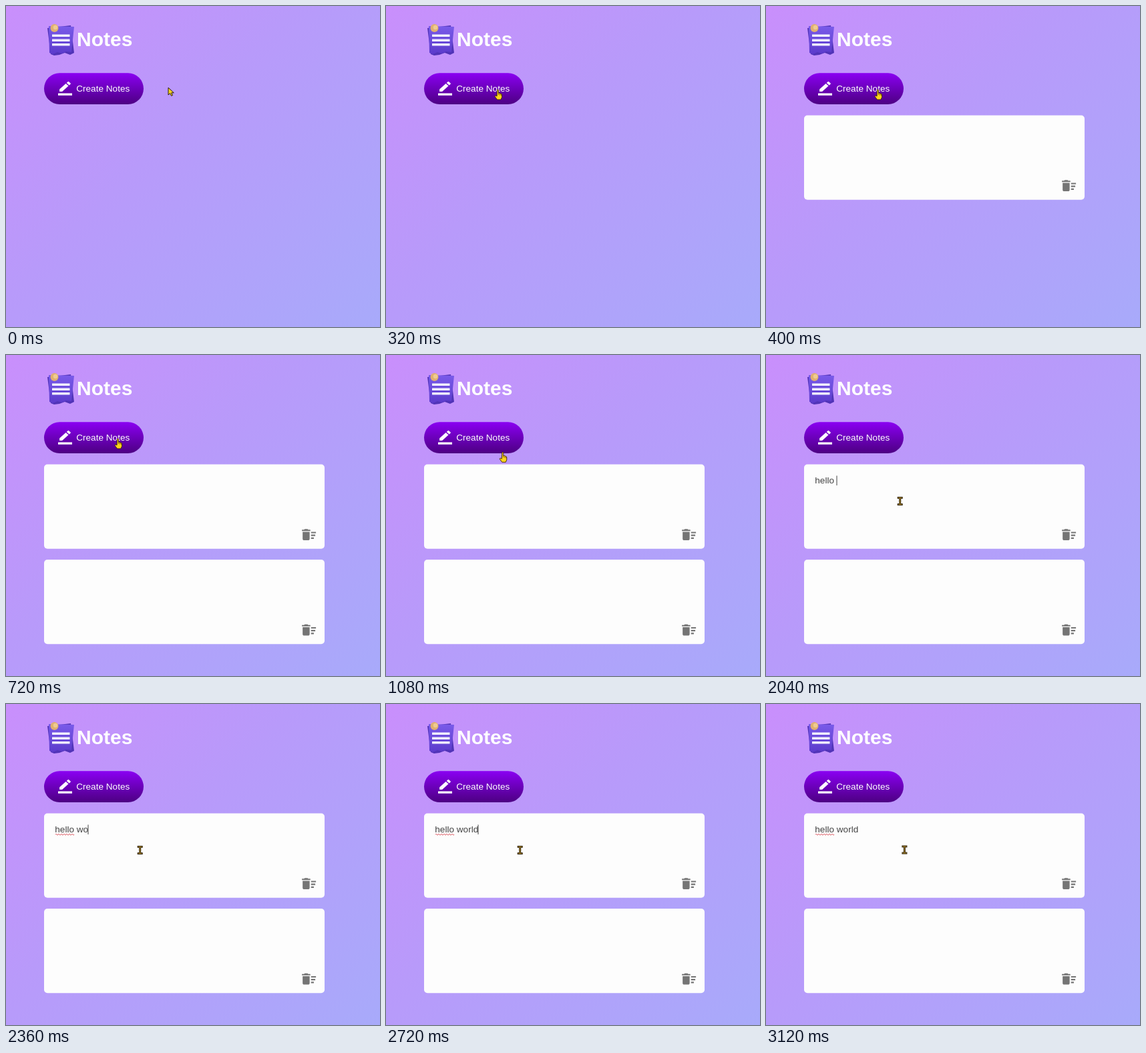
An HTML page for the animation above (3160 ms loop, 560x480 px).

```html
<!DOCTYPE html>
<html lang="en">
<head>
<meta charset="utf-8">
<title>Notes</title>
<style>
html, body { margin: 0; width: 100%; height: 100%; overflow: hidden; }
svg { display: block; }
text { font-family: "Liberation Sans", Arial, sans-serif; font-size: 13.6px; white-space: pre; }
</style>
</head>
<body>
<svg width="560" height="480" viewBox="0 0 560 480">
  <defs>
    <linearGradient id="sky" gradientUnits="userSpaceOnUse" x1="0" y1="0" x2="520" y2="520">
      <stop offset="0" stop-color="#c98ffc"/>
      <stop offset=".42" stop-color="#b89afa"/>
      <stop offset="1" stop-color="#a8aafa"/>
    </linearGradient>
    <linearGradient id="violet" x2="0" y2="1">
      <stop offset="0" stop-color="#8a00f2"/>
      <stop offset="1" stop-color="#4d0083"/>
    </linearGradient>
    <linearGradient id="paper" x2="0" y2="1">
      <stop offset="0" stop-color="#7a5bea"/>
      <stop offset="1" stop-color="#5b3bcb"/>
    </linearGradient>
    <g id="card">
      <rect x="57" y="163.5" width="420" height="126.3" rx="5" fill="#fdfdfd"/>
      <path transform="translate(441 256) scale(1.05)" fill="#757575" d="M15 16h4v2h-4zM15 8h7v2h-7zM15 12h6v2h-6zM3 18c0 1.1.9 2 2 2h6c1.1 0 2-.9 2-2V8H3zM14 5h-3l-1-1H6L5 5H2v2h12z"/>
    </g>
  </defs>

  <rect width="560" height="480" fill="url(#sky)"/>

  <!-- heading -->
  <path d="M62 33 97 29 102 70 96 73 88 70 80 73 72 74 67 72z" fill="#5134b8"/>
  <path d="M64 30 102 31 98 69 90 68 84 71 77 69 70 72 65 70z" fill="url(#paper)"/>
  <path d="M69 44.3H95.5M69 51.2H95.5M69 57.8H95.5" stroke="#f1efff" stroke-width="3.4"/>
  <circle cx="72.5" cy="33" r="6" fill="#e0b070"/>
  <circle cx="74" cy="32" r="3.2" fill="#efcb92"/>
  <text x="106" y="60" fill="#fff" style="font-size:30px;font-weight:700">Notes</text>

  <!-- button -->
  <rect x="57" y="100.3" width="149" height="46.6" rx="23.3" fill="url(#violet)"/>
  <path transform="translate(75.9 111) scale(1.05 .95)" fill="#fff" d="M22 24H2v-3.6h20zM13.06 5.19l3.75 3.75L7.75 18H4v-3.75zM17.88 7.87l-3.75-3.75 1.83-1.83c.39-.39 1.02-.39 1.41 0l2.34 2.34c.39.39.39 1.02 0 1.41z"/>
  <text x="105.2" y="128" fill="#fff">Create Notes</text>

  <!-- notes -->
  <use id="first" href="#card"/>
  <use id="second" href="#card" y="142.5"/>
  <path id="squiggle" fill="none" stroke="#d8414b"/>
  <text id="typed" x="73.3" y="192" fill="#444"></text>
  <rect id="caret" y="180.5" width="1" height="14.5" fill="#444"/>

  <!-- pointers, each drawn around its hot spot -->
  <g id="arrow">
    <path d="M0 0V11L2.7 8.6 4.6 12.4 6.5 11.5 4.7 7.8H8.3z" fill="#f5d21b" stroke="#2a1a10" stroke-linejoin="round"/>
  </g>
  <g id="hand">
    <path d="M-1 0C-1-1.2 1-1.2 1 0V4.5L2.6 4 3.8 5 5 5.2 6 6.5V10.5L4.5 14H-1L-4.5 9.3C-4.6 7.7-3 7.6-1.5 9z" fill="#ffd51c" stroke="#3a2208" stroke-width=".9" stroke-linejoin="round"/>
    <path d="M1 4.5V7M3 5V7.5M4.9 5.8V8" stroke="#5a3608" stroke-width=".7"/>
  </g>
  <g id="beam" fill="none">
    <path d="M-4-5H4M-4 5H4M0-5V5" stroke="#33260e" stroke-width="3"/>
    <path d="M-3-5H3M-3 5H3M0-5V5" stroke="#a98525" stroke-width="1"/>
  </g>
</svg>
<script>
const LOOP = 3160;
const PHRASE = "hello world";
const KEY_TIMES = [1640, 1720, 1800, 1880, 1960, 2020, 2200, 2320, 2440, 2540, 2640];
// time, x, y of the pointer's hot spot
const ROUTE = [
  [0, 243, 122], [40, 243, 122], [280, 167.5, 126], [960, 167.5, 126],
  [1360, 200.7, 218.5], [2960, 200.7, 218.5], [3080, 207.4, 218], [LOOP, 207.4, 218]
];

const el = id => document.getElementById(id);
const show = (id, on) => el(id).setAttribute("visibility", on ? "visible" : "hidden");
const ease = p => p * p * (3 - 2 * p);

let wave = "M74 195.2";
for (let i = 0; i < 7; i++) wave += "q1-2 2 0t2 0";
el("squiggle").setAttribute("d", wave);

function pointerAt(t) {
  const i = ROUTE.findIndex(p => p[0] > t);
  const [t0, x0, y0] = ROUTE[i - 1], [t1, x1, y1] = ROUTE[i];
  const p = ease((t - t0) / (t1 - t0));
  return [x0 + (x1 - x0) * p, y0 + (y1 - y0) * p];
}

function draw(now) {
  const t = now % LOOP;
  show("first", t >= 360);
  show("second", t >= 640);

  const typed = el("typed");
  typed.textContent = PHRASE.slice(0, KEY_TIMES.filter(k => k <= t).length);
  el("caret").setAttribute("x", Math.round(73.3 + typed.getComputedTextLength()) - .5);
  const blinkOn = t < 2640 || (t - 2640) % 1000 < 400;
  show("caret", t >= 1480 && t < 3080 && blinkOn);
  show("squiggle", t >= 2160);

  const [x, y] = pointerAt(t);
  const kind = y > 163 ? "beam" : x < 206 && y < 147 ? "hand" : "arrow";
  for (const id of ["arrow", "hand", "beam"]) show(id, id === kind);
  el(kind).setAttribute("transform", `translate(${x} ${y})`);
}

const start = performance.now();
function tick() {
  draw(performance.now() - start);
  requestAnimationFrame(tick);
}
tick();
</script>
</body>
</html>
```
